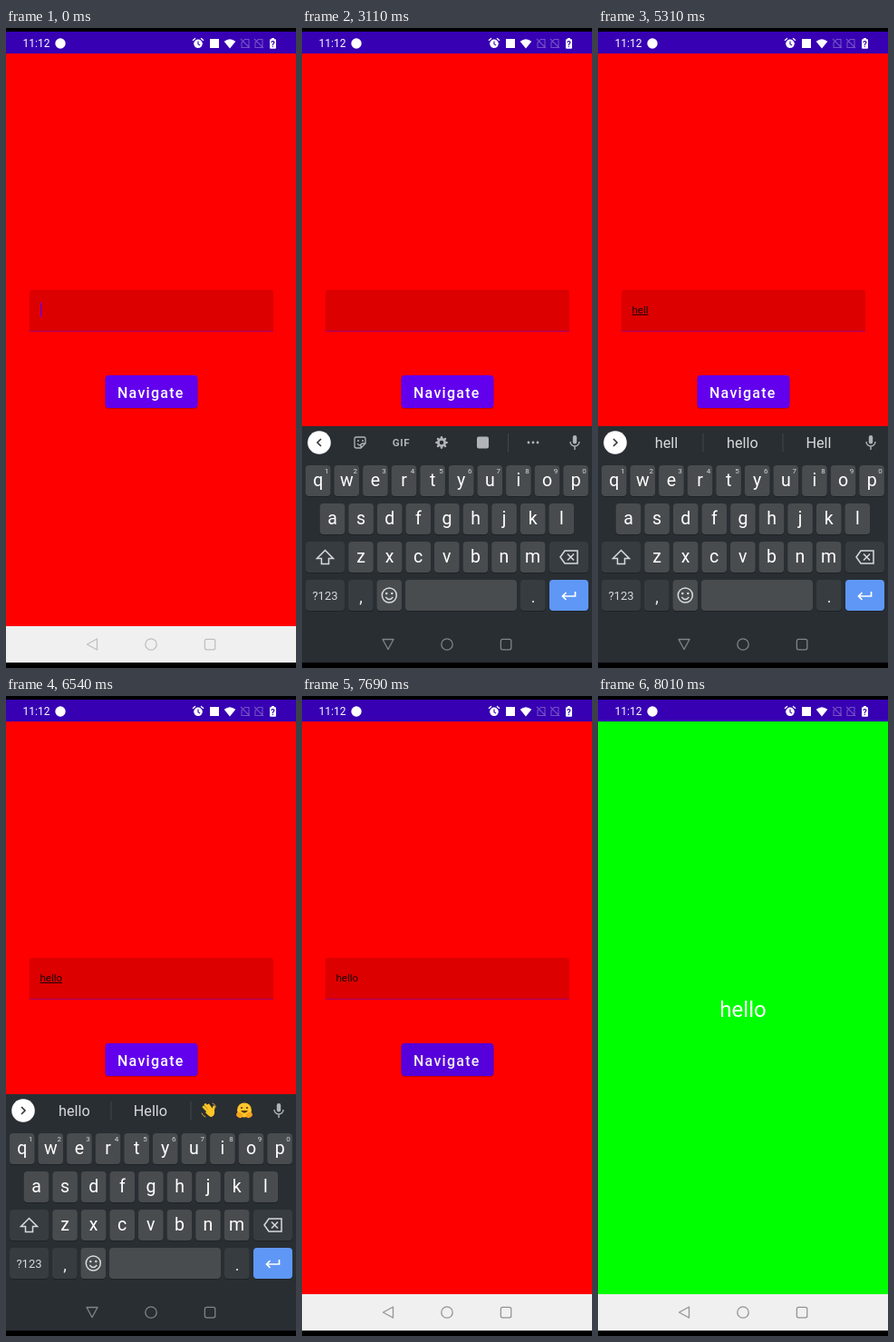
Animation, 320 px wide and 704 px high, one loop 9650 ms. Source, as an HTML page with a canvas:

```html
<!DOCTYPE html>
<html lang="en">
<head>
<meta charset="utf-8">
<title>Navigate with text</title>
<style>
html, body { margin: 0; width: 100%; height: 100%; overflow: hidden; background: #000; }
canvas { display: block; width: 320px; height: 704px; }
</style>
</head>
<body>
<canvas id="stage"></canvas>
<script>
const W = 320, H = 704, LOOP = 9650, TICK = 81.75;
const STATUS_TOP = 4, PAGE_TOP = 28, KB_TOP = 438, NAV_TOP = 658, BOTTOM = 698;
const PITCH = 31.6, KEY_W = 27.6, KEY_H = 34;
const C = {
  status: '#3700b3', red: '#ff0000', green: '#00ff00', field: '#dc0000', line: '#a00070',
  button: '#6200ee', pressed: '#5600dc', nav: '#f0f0f0', board: '#292e33', key: '#484c4f',
  special: '#373c41', shadow: '#1e2226', divider: '#41464b', enter: '#5e97f6',
  icon: '#b0b4b8', word: '#d8dadc', ink: '#1c0000'
};

// Each press shows a popup, then adds a letter and refreshes the suggestions.
const presses = [
  { at: 3680, key: 'h', words: ['h', 'he', 'hey'] },
  { at: 4170, key: 'e', words: ['he', 'hello', 'hey'] },
  { at: 4820, key: 'l', words: ['hel', 'hello', 'help'] },
  { at: 5070, key: 'l', words: ['hell', 'hello', 'Hell'] },
  { at: 5560, key: 'o', words: ['hello', 'Hello'] }
];
const caretOn = [[0, 78], [565, 1135], [1635, 2125], [2285, 3105], [3595, 5310],
  [5555, 6205], [6700, 7190]];
const rows = ['qwertyuiop', 'asdfghjkl', 'zxcvbnm'];
const rowX = [17.7, 33.5, 65];
const rowY = [481, 523, 565, 607];

const canvas = document.getElementById('stage');
const ctx = canvas.getContext('2d');
const ratio = window.devicePixelRatio || 1;
canvas.width = W * ratio;
canvas.height = H * ratio;

const clamp = v => Math.max(0, Math.min(1, v));
const span = (t, a, b) => clamp((t - a) / (b - a));
const easeOut = p => 1 - (1 - p) ** 3;
const smooth = p => p * p * (3 - 2 * p);

function rect(x, y, w, h, color) {
  ctx.fillStyle = color;
  ctx.fillRect(x, y, w, h);
}

function round(x, y, w, h, r, color) {
  ctx.beginPath();
  ctx.roundRect(x, y, w, h, r);
  ctx.fillStyle = color;
  ctx.fill();
}

function disc(x, y, r, color) {
  ctx.beginPath();
  ctx.arc(x, y, r, 0, Math.PI * 2);
  ctx.fillStyle = color;
  ctx.fill();
}

function ring(x, y, r, color, width) {
  ctx.beginPath();
  ctx.arc(x, y, r, 0, Math.PI * 2);
  outline(color, width);
}

function outline(color, width) {
  ctx.strokeStyle = color;
  ctx.lineWidth = width;
  ctx.stroke();
}

function path(d, x, y, color, width) {
  ctx.save();
  ctx.translate(x, y);
  const shape = new Path2D(d);
  if (width) {
    ctx.strokeStyle = color;
    ctx.lineWidth = width;
    ctx.stroke(shape);
  } else {
    ctx.fillStyle = color;
    ctx.fill(shape);
  }
  ctx.restore();
}

function text(str, x, y, size, color, align = 'center', weight = 400, spacing = 0) {
  ctx.font = `${weight} ${size}px Roboto, sans-serif`;
  ctx.letterSpacing = spacing + 'px';
  ctx.textAlign = align;
  ctx.fillStyle = color;
  ctx.fillText(str, x, y);
}

function statusBar() {
  rect(0, 0, W, STATUS_TOP, '#000');
  rect(0, STATUS_TOP, W, PAGE_TOP - STATUS_TOP, C.status);
  text('11:12', 18.5, 21, 12, '#fff', 'left');
  disc(60, 17, 5.7, '#fff');
  // alarm
  disc(212, 17.3, 4.8, '#fff');
  path('M-6 -3.5L-3 -6M6 -3.5L3 -6', 212, 17.3, '#fff', 1.4);
  path('M0 -2.8V0.4L2.2 1.8', 212, 17.3, C.status, 1.1);
  rect(225, 12, 10, 10, '#fff');
  // wifi
  path('M0 5.5L-6.3 -2.2Q0 -7.5 6.3 -2.2Z', 247, 17, '#fff');
  for (const x of [264, 279]) {
    path('M-4 4.5V-1L-0.5 -4.5H4V4.5ZM-5 -5L5 5', x, 17, '#7550c4', 1.1);
  }
  // battery
  round(291, 12.3, 7, 10.4, 1, '#fff');
  rect(293, 11, 3, 2, '#fff');
  text('?', 294.5, 21, 9, C.status, 'center', 700);
}

function navIcons(color, turn) {
  ctx.save();
  ctx.lineJoin = 'round';
  ctx.translate(95, 678);
  ctx.rotate(-turn * Math.PI / 2);
  path('M-5.5 0L5.5 -6V6Z', 0, 0, color, 1.3);
  ctx.restore();
  ring(160, 678, 6.2, color, 1.3);
  ctx.beginPath();
  ctx.roundRect(219.4, 672.4, 11.4, 11.4, 2);
  outline(color, 1.3);
}

function typed(t) {
  return presses.filter(p => t >= p.at + 75);
}

function formPage(t) {
  rect(0, PAGE_TOP, W, NAV_TOP - PAGE_TOP, C.red);
  round(26, 288, 269, 46, [3, 3, 0, 0], C.field);
  rect(26, 333, 269, 1, C.line);
  const value = typed(t).map(p => p.key).join('');
  text(value, 37.5, 314, 11.5, C.ink, 'left');
  const width = ctx.measureText(value).width;
  if (value && t < 6700) rect(37.5, 315, width, 1, C.ink);
  if (caretOn.some(([a, b]) => t >= a && t < b)) {
    rect(38 + width, 302, 1.2, 16, C.button);
  }
  const down = t >= 7515;
  round(109.5, 383, 102, 36, 4, 'rgba(90,0,0,.35)');
  round(109.5, 382, 102, 36, 4, down ? C.pressed : C.button);
  text('Navigate', 123, 407, 16, down ? '#eee' : '#fff', 'left', 500, 1.25);
}

function resultPage() {
  rect(0, PAGE_TOP, W, NAV_TOP - PAGE_TOP, C.green);
  text('hello', 160, 353, 24, '#fff');
}

function mic(x, y) {
  round(x - 2.2, y - 8, 4.4, 9.5, 2.2, C.icon);
  path('M-5 -1A5 5 0 0 0 5 -1M0 4V8', x, y, C.icon, 1.4);
}

function tools() {
  path('M6 1V-4Q6 -6 4 -6H-4Q-6 -6 -6 -4V4Q-6 6 -4 6H1ZM1 6V3Q1 1 3 1H6M-3 1Q-1 4 1 2M-3 -2H-1M2 -2H4',
    64, 456, C.icon, 1.3);
  text('GIF', 109.5, 460, 11.5, C.icon, 'center', 700, 0.6);
  ring(154, 456, 3.7, C.icon, 2.8);
  for (let i = 0; i < 8; i++) {
    const a = i * Math.PI / 4;
    disc(154 + 5.6 * Math.cos(a), 456 + 5.6 * Math.sin(a), 1.3, C.icon);
  }
  round(193, 449.5, 13, 13, 2, C.icon);
  rect(227, 446, 1, 20, C.divider);
  for (const dx of [-5, 0, 5]) disc(255 + dx, 456, 1.4, C.icon);
}

function wave(x, y) {
  ctx.lineCap = 'round';
  path('M-1 1L-6 -4M1 -1L-4 -6.5M3 -1L-0.5 -6M4 2L5.5 -4', x, y, '#ffc526', 2.7);
  path('M-4 2L2 -3L6 0Q7 5 3 7Q0 7 -4 2Z', x, y, '#ffc526');
  path('M4 -8Q7 -7 7.5 -4M-8 3Q-7 6 -4 7', x, y, '#d9a326', 1);
  ctx.lineCap = 'butt';
}

function hug(x, y) {
  disc(x, y - 0.5, 8, '#ffc62c');
  disc(x - 3, y - 3, 1.1, '#5c3a12');
  disc(x + 3, y - 3, 1.1, '#5c3a12');
  path('M-4 0Q0 5.5 4 0Z', x, y, '#5c3a12');
  for (const side of [-1, 1]) {
    ctx.beginPath();
    ctx.ellipse(x + side * 5.3, y + 5, 3.7, 2.8, side * -0.5, 0, Math.PI * 2);
    ctx.fillStyle = '#f6a51d';
    ctx.fill();
  }
}

function strip(t) {
  const last = presses.filter(p => t >= p.at + 155).pop();
  disc(19, 456, 12.8, '#fff');
  path(last ? 'M-2 -4L2 0L-2 4' : 'M2 -4L-2 0L2 4', 19, 456, '#333', 1.6);
  mic(301, 456);
  if (!last) return tools();
  last.words.forEach((w, i) => text(w, 75.4 + i * 84, 462, 16.2, C.word));
  rect(115.5, 446, 1, 20, C.divider);
  rect(203.5, 446, 1, 20, C.divider);
  if (last.words.length < 3) {
    wave(224, 456);
    hug(263, 456);
  }
}

function key(x, y, w, color) {
  round(x, y + 1, w, KEY_H, 4, C.shadow);
  round(x, y, w, KEY_H, 4, color);
}

function letters() {
  rows.forEach((row, r) => [...row].forEach((ch, i) => {
    const x = rowX[r] + i * PITCH;
    key(x - KEY_W / 2, rowY[r], KEY_W, C.key);
    text(ch, x, rowY[r] + 23, 19.5, '#fff');
    if (r === 0) text((i + 1) % 10, x + 9.5, rowY[0] + 9, 8, C.word);
  }));
}

function functionKeys() {
  const [, , y3, y4] = rowY;
  key(4, y3, 43, C.special);
  path('M0 -8L9 1H4V7H-4V1H-9Z', 25.5, y3 + 17.5, C.word, 1.5);
  key(273, y3, 43, C.special);
  path('M-10 0L-5 -7H9V7H-5ZM-2 -3.5L5 3.5M5 -3.5L-2 3.5', 295, y3 + 17, C.word, 1.5);
  key(4, y4, 43, C.special);
  text('?123', 25.5, y4 + 22, 13, C.word);
  key(51, y4, KEY_W, C.special);
  text(',', 65, y4 + 25, 18, '#eee');
  key(82.5, y4, KEY_W, C.key);
  ring(96.3, y4 + 17, 8, C.word, 1.5);
  disc(93.3, y4 + 15, 1.2, C.word);
  disc(99.3, y4 + 15, 1.2, C.word);
  path('M-4 2Q0 7 4 2', 96.3, y4 + 17, C.word, 1.5);
  key(114, y4, 123, C.key);
  key(241, y4, KEY_W, C.special);
  text('.', 255, y4 + 25, 18, '#eee');
  key(273, y4, 43, C.enter);
  path('M7 -4V1H-7M-3 -3L-7 1L-3 5', 294.5, y4 + 17, '#fff', 1.7);
}

function popup(t) {
  const p = presses.find(p => t >= p.at - 5 && t < p.at + 155);
  if (!p) return;
  const r = rows.findIndex(row => row.includes(p.key));
  const x = rowX[r] + rows[r].indexOf(p.key) * PITCH;
  const y = rowY[r];
  round(x - 18, y - 36, 36, KEY_H + 37, 6, C.shadow);
  round(x - 18, y - 37, 36, KEY_H + 37, 6, '#585c60');
  text(p.key, x, y - 9, 25, '#fff');
}

function keyboard(t, shown) {
  ctx.save();
  ctx.beginPath();
  ctx.rect(0, PAGE_TOP, W, BOTTOM - PAGE_TOP);
  ctx.clip();
  ctx.translate(0, (1 - shown) * (BOTTOM - KB_TOP));
  rect(0, KB_TOP, W, BOTTOM - KB_TOP, C.board);
  strip(t);
  letters();
  functionKeys();
  popup(t);
  ctx.restore();
}

function draw(t) {
  ctx.setTransform(ratio, 0, 0, ratio, 0, 0);
  rect(0, 0, W, H, '#000');
  const fade = smooth(span(t, 7690, 8005));
  rect(0, PAGE_TOP, W, NAV_TOP - PAGE_TOP, '#fff');
  if (fade < 1) {
    ctx.globalAlpha = 1 - fade;
    formPage(t);
  }
  if (fade > 0) {
    ctx.globalAlpha = fade;
    resultPage();
  }
  ctx.globalAlpha = 1;
  rect(0, NAV_TOP, W, BOTTOM - NAV_TOP, C.nav);
  const shown = easeOut(span(t, 2300, 2690)) * (1 - smooth(span(t, 6580, 7030)));
  if (shown > 0) keyboard(t, shown);
  const light = t < 2285 ? '#bfbfbf' : '#949494';
  navIcons(shown > 0.2 ? '#80858a' : light, shown);
  statusBar();
}

const start = performance.now();
function loop() {
  const t = (performance.now() - start) % LOOP;
  draw(Math.floor((t + 4) / TICK) * TICK);
  requestAnimationFrame(loop);
}
loop();
</script>
</body>
</html>
```
